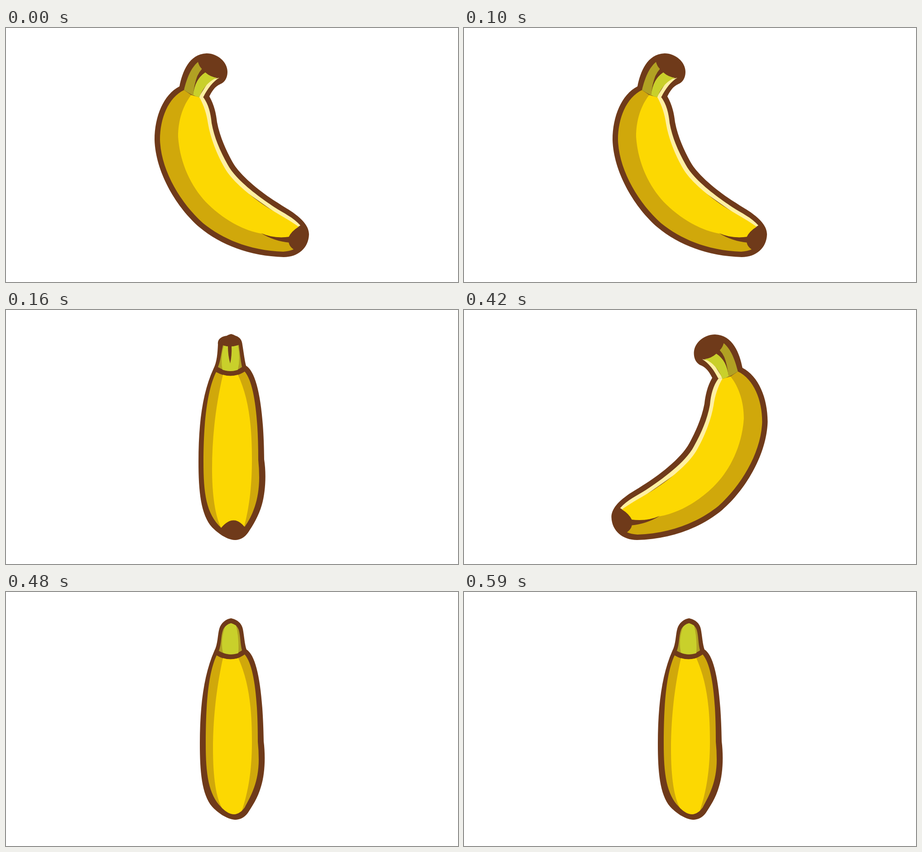
These frames come from a looping animation (998x561 px, 660 ms). An HTML page:

```html
<!DOCTYPE html>
<html lang="en">
<head>
<meta charset="utf-8">
<title>Turning banana</title>
<style>
  html, body { margin: 0; width: 100%; height: 100%; overflow: hidden; background: #fff; }
  svg { display: block; width: 100%; height: 100%; }

  .rind { fill: #6f3a1a; }
  .shade { fill: #d0a80b; }
  .flesh { fill: #fcd802; }
  .shine { fill: #fff0a3; }
  .stem-shade { fill: #b1a123; }
  .stem { fill: #c9d02b; }

  .pose { visibility: hidden; animation: turn 660ms step-end infinite; }
  .front { animation-delay: -500ms; }
  .left { animation-delay: -340ms; }
  .back { animation-name: turn-long; animation-delay: -180ms; }

  @keyframes turn { 0% { visibility: visible; } 24.2425%, 100% { visibility: hidden; } }
  @keyframes turn-long { 0% { visibility: visible; } 27.273%, 100% { visibility: hidden; } }
</style>
</head>
<body>
<svg viewBox="0 0 998 561" preserveAspectRatio="none">
  <defs>
    <g id="side">
      <path class="rind" d="M383 129C389 98 404 57 443 56C466 56 489 74 489 97C489 110 483 120 473 124C461 129 454 141 449 151C460 170 464 190 466 208C472 240 486 270 499 294C517 328 569 367 600 386C613 395 627 402 637 410C656 424 669 439 669 456C668 486 645 506 613 506C540 504 475 480 427 440C376 396 330 318 328 247C328 195 348 147 383 129Z"/>
      <path class="shade" d="M393 137C358 154 340 200 340 247C342 314 385 386 435 431C482 469 543 492 612 494Q626 493 635 489C628 484 625 479 624 472L563 453L500 380L435 240L409 148Z"/>
      <path class="shine" d="M426 152L435 152C447 168 452 188 454 210C460 244 475 276 489 301C507 336 560 374 593 396C613 409 634 418 650 436L642 441L470 320Z"/>
      <path class="flesh" d="M409 148L427 153C437 171 443 190 446 211C452 246 467 281 481 306C500 342 552 381 588 403C610 416 630 427 646 439Q630 449 624 462Q592 466 563 454C521 446 480 422 447 390C412 356 384 302 380 240C380 205 390 172 409 148Z"/>
      <path class="rind" d="M563 453Q592 466 626 461V474Q592 471 563 453Z"/>
      <path class="stem-shade" d="M393 137C399 112 408 88 424 75Q426 84 433 91C419 108 416 125 413 149Q402 143 393 137Z"/>
      <path class="shine" d="M471 110C457 118 445 134 436 152L426 152L450 114Z"/>
      <path class="stem" d="M413 148C416 125 424 108 440 98Q451 108 466 110C447 117 434 134 427 153Q420 152 413 148Z"/>
      <path class="rind" d="M433 90L441 97Q425 108 418 124Q420 104 433 90Z"/>
    </g>
  </defs>

  <g class="pose"><use href="#side"/></g>

  <g class="pose front">
    <path class="rind" d="M458 130C466 115 467 94 468 76C466 64 477 58 487 57Q492 54 497 53Q502 54 507 57C516 60 521 66 522 77C525 95 527 112 530 123C554 137 569 210 570 330C575 362 573 402 565 430C558 455 545 476 535 491C526 504 516 508 505 508C486 507 467 492 455 480C430 452 425 400 425 335C425 250 434 182 458 130Z"/>
    <path class="shade" d="M464 137C445 175 436 245 436 335C436 405 442 450 475 481Q502 449 527 479C544 455 559 420 559 370Q559 350 557 331C557 235 548 160 527 136Q497 155.500 464 137Z"/>
    <path class="flesh" d="M479 143C462 215 455 285 455 350C455 410 462 455 475 481Q502 449 526 478C536 440 543 395 543 330C543 250 535 192 512 143Q496 148 479 143Z"/>
    <path class="stem-shade" d="M468 126C474 111 475 95 479 78Q496 84 514 77C516 94 518 111 521 126Q497 144 468 126Z"/>
    <path class="stem" d="M481 79Q473 106 478 132Q495 138 512 132Q518 105 512 78Q496 83 481 79Z"/>
    <path class="rind" d="M490 79H498Q499 101 495 118Q490 101 490 79Z"/>
  </g>

  <g class="pose left">
    <use href="#side" transform="matrix(-1.0117 0 0 1.009 1002.3 -2.5)"/>
  </g>

  <g class="pose back">
    <path class="rind" d="M460 130C468 115 467 95 471 81C475 68 485 60 497 58C510 61 520 68 523 82C526 98 527 116 531 127C555 142 567 215 569 330C573 362 572 402 563 430C556 455 543 474 534 488C525 500 515 503 505 503C486 501 467 487 455 474C432 447 428 395 428 335C428 250 437 182 460 130Z"/>
    <path class="shade" d="M465 140C447 178 441 245 441 335C441 402 447 447 475 475Q490 491 504 491Q517 490 527 476C541 450 558 420 558 370Q558 350 556 331C556 235 548 162 527 138Q497 159 465 140Z"/>
    <path class="flesh" d="M479 146C463 218 457 288 457 345C457 410 464 455 477 477Q491 491 504 491Q513 490 521 483C535 440 543 395 543 330C543 250 535 196 513 146Q496 151 479 146Z"/>
    <path class="stem-shade" d="M470 130C476 114 474 98 479 84C483 75 490 71 497 69C504 71 511 75 514 84C518 99 517 113 521 129Q497 146 470 130Z"/>
    <path class="stem" d="M483 78Q473 108 479 134Q496 141 513 135Q515 103 508 74Q503 71 497 69Q488 71 483 78Z"/>
  </g>
</svg>
</body>
</html>
```
